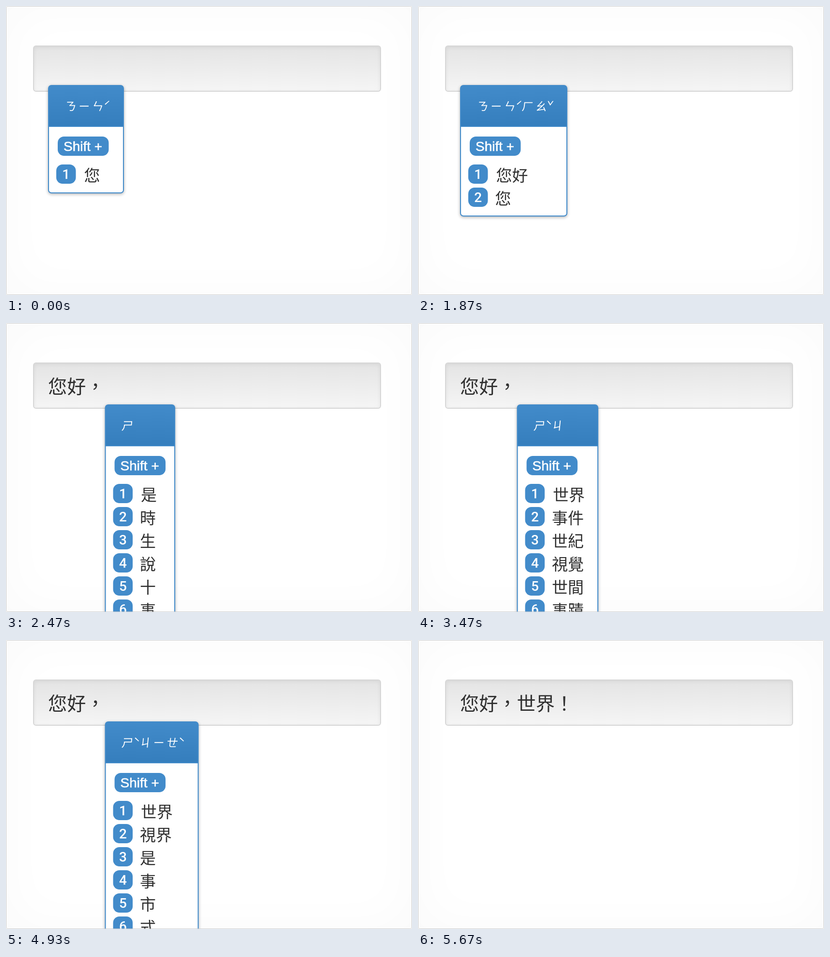
An HTML page with a canvas for the animation above (5740 ms loop, 840x600 px).

```html
<!DOCTYPE html>
<html lang="zh-TW">
<head>
<meta charset="utf-8">
<title>注音輸入</title>
<style>
  html, body { margin: 0; width: 840px; height: 600px; overflow: hidden; background: #fff; }
  body { position: relative; box-shadow: inset 0 0 110px rgba(0, 0, 0, .025); }
  .field {
    position: absolute; left: 56px; top: 82px; width: 720px; height: 96px;
    box-sizing: border-box; border: 2px solid #d6d6d6; border-radius: 6px;
    background: linear-gradient(#e4e4e4, #f5f5f5);
    box-shadow: inset 0 2px 8px rgba(0, 0, 0, .06);
  }
  canvas { position: absolute; left: 0; top: 0; }
</style>
</head>
<body>
<div class="field"></div>
<canvas width="840" height="600"></canvas>
<script>
const ctx = document.querySelector('canvas').getContext('2d');
const LOOP = 5740, BLUE = '#428bca', INK = '#303030';
const CJK = '"Noto Sans CJK TC", "Noto Sans CJK", sans-serif';
const LATIN = '"Liberation Sans", Arial, sans-serif';
const KEY = 28, TONE = 9, PAD = 32, ROW = 48;

// start time, committed text, phonetic keys, candidates
const worldList = '世界 視界 是 事 市 式';
const steps = [
  [0, '', 'ㄋㄧㄣˊ', '您'],
  [70, '', 'ㄋㄧㄣˊㄏ', '您好 您'],
  [870, '', 'ㄋㄧㄣˊㄏㄠ', '您好 您'],
  [1470, '', 'ㄋㄧㄣˊㄏㄠˇ', '您好 您'],
  [1930, '您好'],
  [2130, '您好，'],
  [2330, '您好，', 'ㄕ', '是 時 生 說 十 事'],
  [2800, '您好，', 'ㄕˋ', '是 事 市 式 世 視'],
  [3330, '您好，', 'ㄕˋㄐ', '世界 事件 世紀 視覺 世間 事蹟'],
  [3930, '您好，', 'ㄕˋㄐㄧ', '世界 事件 世紀 世間 事蹟 市價'],
  [4470, '您好，', 'ㄕˋㄐㄧㄝ', worldList],
  [4730, '您好，', 'ㄕˋㄐㄧㄝˋ', worldList],
  [5470, '您好，世界'],
  [5600, '您好，世界！']
];

const keyWidth = key => 'ˊˇˋ'.includes(key) ? TONE : KEY;

function box(x, y, w, h, r, fill) {
  ctx.beginPath();
  ctx.roundRect(x, y, w, h, r);
  ctx.fillStyle = fill;
  ctx.fill();
}

function label(text, x, y, font, color, align = 'left') {
  ctx.font = font;
  ctx.textAlign = align;
  ctx.fillStyle = color;
  ctx.fillText(text, x, y);
}

function drawKeys(keys) {
  let x = PAD;
  for (const key of keys) {
    const w = keyWidth(key);
    ctx.save();
    ctx.translate(x + w / 2, 53);
    ctx.transform(1, 0, -.1, 1, 0, 0);
    label(key, 0, 0, `24px ${CJK}`, '#fff', 'center');
    ctx.restore();
    x += w;
  }
}

function drawPopup(left, top, keys, words) {
  const keysWidth = [...keys].reduce((sum, key) => sum + keyWidth(key), 2 * PAD);
  const longest = Math.max(...words.map(word => word.length));
  const width = Math.max(145.5, keysWidth, 102.5 + 33 * longest);
  const height = 177 + ROW * words.length;

  ctx.save();
  ctx.translate(left, top);
  ctx.save();
  ctx.shadowColor = 'rgba(0,0,0,.3)';
  ctx.shadowBlur = 6;
  ctx.shadowOffsetY = 2;
  box(0, 0, width, height, 7, BLUE);
  ctx.restore();
  box(2, 87, width - 4, height - 89, [0, 0, 5, 5], '#fff');

  const shade = ctx.createLinearGradient(0, 0, 0, 85);
  shade.addColorStop(0, BLUE);
  shade.addColorStop(1, '#357ebd');
  box(2, 2, width - 4, 83, [5, 5, 0, 0], shade);
  drawKeys(keys);

  box(20, 107, 105.5, 40, 13, BLUE);
  label('Shift +', 32, 137, `28px ${LATIN}`, '#fff');
  ctx.strokeStyle = '#fff';
  ctx.lineWidth = .6;
  ctx.strokeText('Shift +', 32, 137);

  words.forEach((word, i) => {
    const y = 165 + ROW * i;
    box(17, y, 40.5, 40, 13, BLUE);
    label(i + 1, 37.3, y + 30, '500 28px Roboto, sans-serif', '#fff', 'center');
    label(word, i ? 72.5 : 74.5, y + 34.5, `33px ${CJK}`, INK);
  });
  ctx.restore();
}

function draw(now) {
  const time = now % LOOP;
  const [, text, keys, words] = steps.findLast(step => step[0] <= time);
  ctx.clearRect(0, 0, 840, 600);
  label(text, 87, 146, `39.2px ${CJK}`, INK);
  if (keys) drawPopup(87 + 39.2 * text.length, text ? 169 : 164, keys, words.split(' '));
  ctx.beginPath();
  ctx.roundRect(.5, .5, 839, 599, 3);
  ctx.strokeStyle = '#cecece';
  ctx.lineWidth = 1;
  ctx.stroke();
  requestAnimationFrame(draw);
}
requestAnimationFrame(draw);
</script>
</body>
</html>
```
